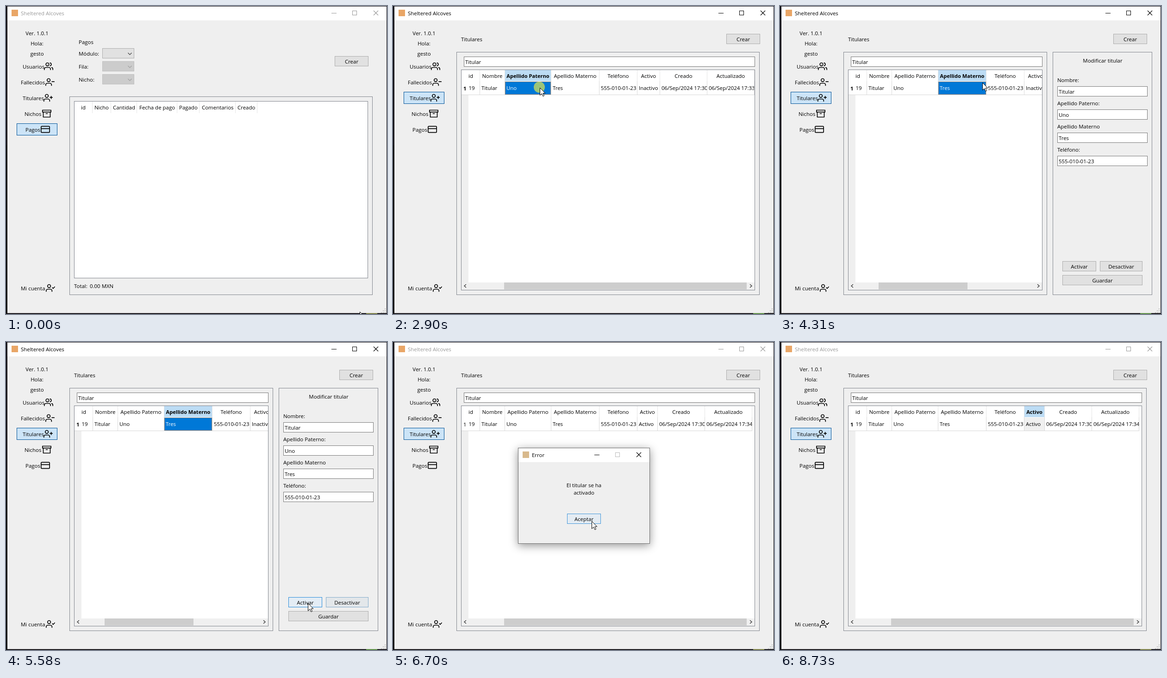
Recreate the animation shown at these times as an HTML page with a canvas. Size 823 by 664 pixels, loop 8.8 s.

```html
<!DOCTYPE html>
<html lang="es">
<head>
<meta charset="utf-8">
<title>Titulares</title>
<style>
html, body { margin: 0; width: 100%; height: 100%; overflow: hidden; background: #efefef; }
canvas { display: block; }
</style>
</head>
<body>
<canvas id="stage" width="823" height="664"></canvas>
<script>
const ctx = document.getElementById('stage').getContext('2d');
const LOOP = 8800;
const APP = 'Sheltered Alcoves', USER = 'gesto', PHONE = '555-010-01-23';
const FACE = '"Open Sans", "Noto Sans", sans-serif';
const BG = '#efefef', FRAME = '#83878f', BLUE = '#0078d7';

// Times at which the interface switches state
const T = {
  focus: 1680, page: 2150, pickUno: 2900, pickTres: 3900, panel: 4030,
  activate: 5720, dialog: 5900, accept: 6860, closed: 7000, pickActivo: 8050, blur: 8730
};

// Pointer: time, x, y
const MOVES = [
  [0, 764, 659], [70, 764, 659], [680, 38, 156], [1540, 38, 156], [1900, 69, 205],
  [2130, 69, 205], [2570, 317, 176], [3140, 317, 176], [3740, 435, 163], [3950, 437, 165],
  [4380, 437, 165], [5320, 722, 558], [5400, 718, 559], [5560, 652, 563], [5900, 652, 563],
  [6640, 429, 386], [7720, 429, 386], [7920, 640, 118], [8050, 545, 181], [LOOP, 545, 181]
];
const CLICKS = [[1900, 2130], [2880, 3000], [3880, 4000], [5700, 5820], [6840, 6960], [8010, 8070]];

const userBody = 'M16 21v-2a4 4 0 0 0-4-4H5a4 4 0 0 0-4 4v2M12.5 7a4 4 0 1 1-8 0a4 4 0 1 1 8 0';
const NAV = [
  ['Usuarios', 36, 82, 130, 'M17 21v-2a4 4 0 0 0-4-4H5a4 4 0 0 0-4 4v2M13 7a4 4 0 1 1-8 0a4 4 0 1 1 8 0M23 21v-2a4 4 0 0 0-3-3.87M16 3.13a4 4 0 0 1 0 7.75'],
  ['Fallecidos', 32, 85, 164, userBody + 'M23 11h-6'],
  ['Titulares', 36, 81, 198, userBody + 'M20 8v6M23 11h-6'],
  ['Nichos', 40, 78, 232, 'M21 8v13H3V8M1 3h22v5H1zM10 12h4'],
  ['Pagos', 42, 75, 266, 'M3 4h18a2 2 0 0 1 2 2v12a2 2 0 0 1-2 2H3a2 2 0 0 1-2-2V6a2 2 0 0 1 2-2zM1 10h22'],
  ['Mi cuenta', 32, 86, 608, userBody + 'M17 11l2 2 4-4']
].map(([label, tx, ix, y, d]) => ({ label, tx, ix, y, icon: new Path2D(d) }));
const ARROW = new Path2D('M.5.5V16.5L4.3 12.9L7 18.7L9.5 17.6L6.9 12H11.8Z');

const ramp = (t, a, b) => Math.max(0, Math.min(1, (t - a) / (b - a)));
const ease = u => u * u * (3 - 2 * u);
const pulse = (t, a, b, c, d) => ramp(t, a, b) * (1 - ramp(t, c, d));

function fill(x, y, w, h, color) {
  ctx.fillStyle = color;
  ctx.fillRect(x, y, w, h);
}

// Filled box with a 1px inner border, given by its edges
function box(x, y, r, b, color, edge) {
  fill(x, y, r - x, b - y, color);
  ctx.strokeStyle = edge;
  ctx.lineWidth = 1;
  ctx.strokeRect(x + .5, y + .5, r - x - 1, b - y - 1);
}

function dotted(x, y, r, b, color) {
  ctx.save();
  ctx.setLineDash([1, 1]);
  ctx.strokeStyle = color;
  ctx.lineWidth = 1;
  ctx.strokeRect(x + .5, y + .5, r - x - 1, b - y - 1);
  ctx.restore();
}

function text(s, x, mid, { color = '#000', align = 'left', bold = false, size = 11.45 } = {}) {
  ctx.font = (bold ? 'bold 11.1px ' : size + 'px ') + FACE;
  ctx.fillStyle = color;
  ctx.textAlign = align;
  ctx.fillText(s, x, mid + 4);
}

function clip(x, y, w, h, draw) {
  ctx.save();
  ctx.beginPath();
  ctx.rect(x, y, w, h);
  ctx.clip();
  draw();
  ctx.restore();
}

function faded(alpha, draw) {
  if (alpha <= 0) return;
  ctx.save();
  ctx.globalAlpha *= alpha;
  draw();
  ctx.restore();
}

function button(x, y, r, b, label, hover = 0) {
  box(x, y, r, b, '#e1e1e1', '#adadad');
  faded(hover, () => box(x, y, r, b, '#e5f1fb', BLUE));
  text(label, (x + r) / 2, (y + b) / 2 + .5, { align: 'center' });
}

function lines(points, color, width = 1) {
  ctx.beginPath();
  points.forEach(([x, y], i) => i ? ctx.lineTo(x, y) : ctx.moveTo(x, y));
  ctx.strokeStyle = color;
  ctx.lineWidth = width;
  ctx.stroke();
}

function chevron(x, y, dx, dy, color, width = 1.2) {
  const p = dx ? [[x - dx, y - 3.5], [x + dx, y], [x - dx, y + 3.5]]
               : [[x - 4, y - dy], [x, y + dy], [x + 4, y - dy]];
  lines(p, color, width);
}

function caption(x, y, color, maxColor = color) {
  fill(x, y, 11, 1, color);
  ctx.strokeStyle = maxColor;
  ctx.lineWidth = 1;
  ctx.strokeRect(x + 45.5, y - 4.5, 9, 9);
  lines([[x + 91, y - 5], [x + 101, y + 5]], color, 1.1);
  lines([[x + 101, y - 5], [x + 91, y + 5]], color, 1.1);
}

function drawWindow(active) {
  fill(0, 0, 823, 664, '#17151a');
  fill(0, 300, 2, 364, '#0c0a0c');
  fill(3, 1, 819, 661, BG);
  fill(3, 1, 819, 30, '#fff');
  fill(778, 662, 24, 2, active ? '#5d8f45' : '#7c8045');
  fill(12, 8, 14, 14, '#e9a667');
  const ink = active ? '#000' : '#999';
  text(APP, 32, 16, { color: ink });
  caption(703, 15, ink);
  for (let i = 0; i < 3; i++)
    for (let j = 0; j <= i; j++) fill(818 - j * 4, 652 + i * 4, 2, 2, '#bdbdbd');
}

function drawNav(t) {
  text('Ver. 1.0.1', 67, 59, { align: 'center' });
  text('Hola:', 67, 81, { align: 'center' });
  text(USER, 67, 103, { align: 'center' });
  const onPage = t >= T.page;
  const current = onPage ? 'Titulares' : 'Pagos';
  const focused = t >= T.focus && t < T.pickUno || t >= T.closed && t < T.pickActivo;
  for (const n of NAV) {
    const top = n.y - 13;
    if (n.label === current) box(23, top, 111, top + 26, '#cce4f7', '#005499');
    if (n.label === 'Titulares') {
      if (!onPage) faded(ramp(t, 1700, 1900), () => box(23, top, 111, top + 26, '#deedf8', '#a8cdea'));
      if (focused) dotted(24, top + 1, 110, top + 25, '#000');
    }
    text(n.label, n.tx, n.y + 1);
    ctx.save();
    ctx.translate(n.ix, n.y - 10);
    ctx.scale(20 / 24, 20 / 24);
    ctx.lineWidth = 2;
    ctx.lineCap = ctx.lineJoin = 'round';
    ctx.strokeStyle = '#000';
    ctx.stroke(n.icon);
    ctx.restore();
  }
}

function drawPayments() {
  text('Pagos', 157, 78);
  ['Módulo:', 'Fila:', 'Nicho:'].forEach((s, i) => {
    const y = 91 + i * 28;
    text(s, 157, y + 12);
    box(208, y, 277, y + 22, i ? '#cccccc' : '#e1e1e1', i ? '#bfbfbf' : '#adadad');
    chevron(267.5, y + 12, 0, 2, i ? '#a0a0a0' : '#444');
  });
  button(710, 108, 783, 130, 'Crear');
  box(137, 195, 792, 623, BG, FRAME);
  box(147, 205, 782, 587, '#fff', FRAME);
  [['id', 162, 186], ['Nicho', 191, 226], ['Cantidad', 231, 282], ['Fecha de pago', 288, 369],
   ['Pagado', 374, 417], ['Comentarios', 423, 495], ['Creado', 500, 542]].forEach(([s, x, edge]) => {
    text(s, x, 219);
    fill(edge, 206, 1, 25, '#e5e5e5');
  });
  text('Total:', 147, 604);
  text('0.00 MXN', 181, 604);
}

function drawTable(t, right, selected, cellActive) {
  const done = t >= T.dialog;
  const edges = done ? [163, 187, 241, 341, 445, 527, 571, 673, 775]
                     : [163, 187, 241, 341, 445, 527, 576, 678, 780];
  const heads = ['id', 'Nombre', 'Apellido Paterno', 'Apellido Materno', 'Teléfono', 'Activo', 'Creado', 'Actualizado'];
  const cells = ['519', 'Titular', 'Uno', 'Tres', PHONE, done ? 'Activo' : 'Inactivo',
    '06/Sep/2024 17:30', done ? '06/Sep/2024 17:34' : '06/Sep/2024 17:33'];
  box(137, 99, right + 10, 623, BG, FRAME);
  box(153, 109, right, 131, '#fff', '#7a7a7a');
  text('Titular', 156, 121);
  box(147, 137, right, 613, '#fff', FRAME);
  fill(148, 192, 15, 404, BG);
  text('1', 152, 178, { bold: selected >= 0 });
  clip(163, 138, right - 164, 458, () => {
    heads.forEach((s, i) => {
      const x = edges[i], r = edges[i + 1], on = i === selected;
      if (on) {
        fill(x + 1, 138, r - x, 24, '#bcdcf4');
        fill(x + 1, 163, r - x - 1, 28, cellActive ? BLUE : '#f0f0f0');
        if (cellActive) dotted(x + 1, 163, r, 191, '#ff8728');
      }
      text(s, i ? (x + r + 1) / 2 : 163, 151, { align: i ? 'center' : 'left', bold: on });
      text(cells[i], i ? x + 4 : 157, 177, { color: on && cellActive ? '#fff' : '#000' });
      fill(r, 138, 1, 24, '#e5e5e5');
      fill(r, 162, 1, 29, '#d8d8d8');
    });
    fill(163, 191, edges[8] - 162, 1, '#d8d8d8');
  });
  fill(148, 191, 15, 1, '#d8d8d8');
  fill(148, 596, right - 149, 16, '#f0f0f0');
  const wide = right > 700;
  fill(wide ? 240 : 213, 596, wide ? 524 : 192, 15, '#cdcdcd');
  chevron(156, 603.5, -2, 0, '#404040', 1.5);
  chevron(right - 9, 603.5, 2, 0, '#404040', 1.5);
}

function drawPanel(t) {
  box(589, 99, 804, 623, BG, FRAME);
  text('Modificar titular', 697, 118, { align: 'center' });
  [['Nombre:', 'Titular'], ['Apellido Paterno:', 'Uno'], ['Apellido Materno', 'Tres'], ['Teléfono:', PHONE]]
    .forEach(([label, value], i) => {
      const y = 160 + i * 50;
      text(label, 599, y);
      box(599, y + 13, 794, y + 35, '#fff', '#7a7a7a');
      text(value, 602, y + 25);
    });
  button(610, 550, 683, 572, 'Activar', ramp(t, 5500, 5600));
  button(691, 550, 783, 572, 'Desactivar', pulse(t, 5250, 5350, 5450, 5640));
  button(610, 580, 783, 602, 'Guardar');
}

function drawHolders(t) {
  const panel = t >= T.panel && t < T.dialog;
  let selected = -1;
  if (t >= T.pickUno) selected = 2;
  if (t >= T.pickTres) selected = 3;
  if (t >= T.dialog) selected = t >= T.pickActivo ? 5 : -1;
  const cellActive = t < T.activate || t >= T.dialog && t < T.blur;
  text('Titulares', 147, 72);
  button(720, 60, 793, 82, 'Crear');
  drawTable(t, panel ? 567 : 782, selected, cellActive);
  if (panel) drawPanel(t);
}

function drawDialog(t) {
  const show = pulse(t, T.dialog, T.dialog + 160, T.closed - 60, T.closed + 80);
  faded(show, () => {
    ctx.save();
    ctx.shadowColor = 'rgba(0,0,0,.42)';
    ctx.shadowBlur = 18;
    ctx.shadowOffsetY = 4;
    fill(270, 228, 285, 207, BG);
    ctx.restore();
    box(270, 228, 555, 435, BG, '#6e6e6e');
    fill(271, 229, 283, 30, '#fff');
    fill(280, 236, 14, 14, '#d8b98c');
    text('Error', 300, 244);
    caption(435, 243, '#000', '#bbb');
    text('El titular se ha', 412.5, 309, { align: 'center' });
    text('activado', 412.5, 325, { align: 'center' });
    button(376, 370, 449, 392, 'Aceptar', ramp(t, 6590, 6750));
  });
}

function pointer(t) {
  const i = Math.max(1, MOVES.findIndex(m => m[0] > t));
  const [t0, x0, y0] = MOVES[i - 1], [t1, x1, y1] = MOVES[i];
  const u = ease(ramp(t, t0, t1));
  return [Math.round(x0 + (x1 - x0) * u), Math.round(y0 + (y1 - y0) * u)];
}

function drawPointer(t) {
  if (t >= T.blur) return;
  const [x, y] = pointer(t);
  if (CLICKS.some(([a, b]) => t >= a && t < b)) {
    ctx.fillStyle = 'rgba(240,236,70,.65)';
    ctx.beginPath();
    ctx.arc(x - 1, y - 1, 12, 0, Math.PI * 2);
    ctx.fill();
  }
  ctx.save();
  ctx.translate(x, y);
  ctx.fillStyle = '#fff';
  ctx.fill(ARROW);
  ctx.strokeStyle = '#000';
  ctx.lineWidth = 1;
  ctx.stroke(ARROW);
  ctx.restore();
}

function draw(t) {
  const active = t >= T.focus && t < T.dialog || t >= T.closed && t < T.blur;
  drawWindow(active);
  drawNav(t);
  if (t < T.page) drawPayments();
  else drawHolders(t);
  drawDialog(t);
  drawPointer(t);
}

const start = performance.now();
function tick() {
  draw((performance.now() - start) % LOOP);
  requestAnimationFrame(tick);
}
tick();
</script>
</body>
</html>
```
